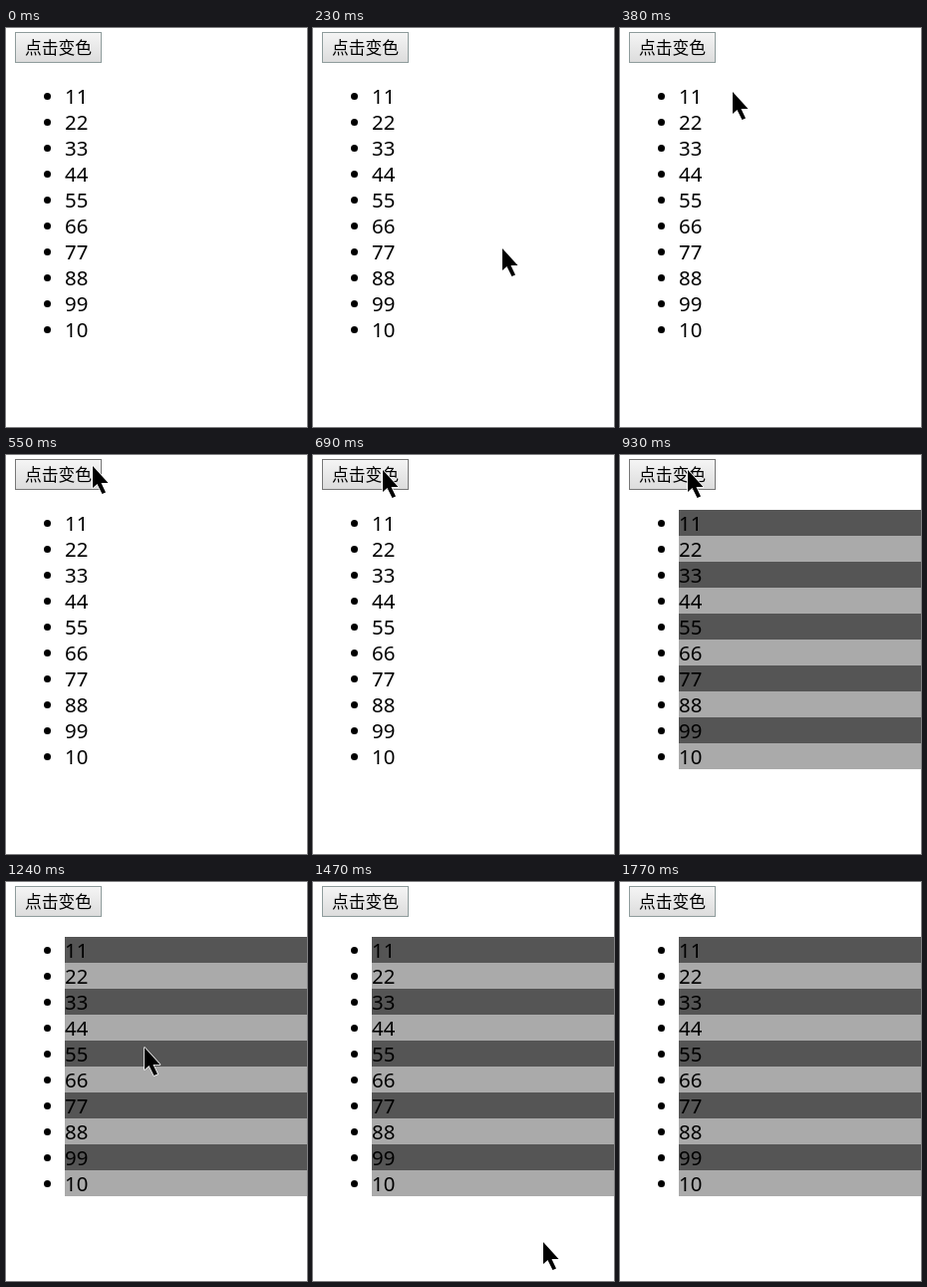
An HTML page for the animation above (2600 ms loop, 302 px wide and 400 px high).

```html
<!DOCTYPE html>
<html lang="zh">
<head>
<meta charset="utf-8">
<title>点击变色</title>
<style>
  html, body { margin: 0; width: 100%; height: 100%; overflow: hidden; background: #fff; }
  svg { display: block; }
  .item { font: 20.4px "Noto Sans", "Open Sans", sans-serif; }
  .label { font: 300 16.8px "Noto Sans CJK SC", "Noto Sans CJK", sans-serif; }
</style>
</head>
<body>
<svg width="302" height="400" viewBox="0 0 302 400">
  <defs>
    <linearGradient id="face" x2="0" y2="1">
      <stop offset="0" stop-color="#f5f5f5"/>
      <stop offset="1" stop-color="#dcdcdc"/>
    </linearGradient>
  </defs>
  <rect id="button" x="9.5" y="4.5" width="86" height="30" fill="url(#face)"/>
  <text class="label" x="19" y="26">点击变色</text>
  <g id="stripes"></g>
  <g id="list"></g>
  <path id="cursor" d="M0 0V22L4.5 18L9.5 28L13 26.5L8.5 17H15.5Z"
        stroke="#fff" stroke-width="1.6" stroke-linejoin="round" paint-order="stroke"/>
  <circle id="press" cx="67.5" cy="16.5" r="15.5" fill="#ff0" fill-opacity=".6"/>
</svg>
<script>
const LOOP = 2600, PRESS = 840, RELEASE = 930;
const START = 145, TICK = 77.2; // the pointer moves in ticks

// Pointer stops: tick, x, y
const stops = [
  [0, 244, 334], [1, 190, 221], [5, 87, 11], [8, 68, 15],
  [13, 68, 15], [17, 231, 361], [20, 236, 395]
];

const $ = id => document.getElementById(id);
const [button, stripes, list, press, cursor] =
  ['button', 'stripes', 'list', 'press', 'cursor'].map($);

function add(parent, tag, attrs, text = '') {
  const el = document.createElementNS('http://www.w3.org/2000/svg', tag);
  for (const name in attrs) el.setAttribute(name, attrs[name]);
  el.textContent = text;
  parent.append(el);
}

for (let i = 0; i < 10; i++) {
  const y = 55 + 26 * i;
  add(stripes, 'rect', { x: 59, y, width: 243, height: 26, fill: i % 2 ? '#aaa' : '#555' });
  add(list, 'circle', { cx: 41.5, cy: y + 13.5, r: 3.5 });
  add(list, 'text', { class: 'item', x: 59, y: y + 21 }, i < 9 ? (i + 1) * 11 : 10);
}

const show = (el, on) => el.setAttribute('visibility', on ? 'visible' : 'hidden');
const easeOut = u => u * (2 - u);

// Pointer position at a tick, or null while it is off the stage
function pointer(tick) {
  const next = stops.findIndex(stop => stop[0] >= tick);
  if (tick < 0 || next < 0) return null;
  const to = stops[next], from = stops[next - 1] || to;
  const k = easeOut((tick - from[0]) / (to[0] - from[0] || 1));
  return [1, 2].map(i => Math.round(from[i] + (to[i] - from[i]) * k));
}

function draw() {
  const t = performance.now() % LOOP;
  const pos = pointer(Math.floor((t - START) / TICK));
  const [x, y] = pos || [-99, -99];
  const hover = x >= 9 && x < 96 && y >= 4 && y < 35;

  show(cursor, pos);
  cursor.setAttribute('transform', `translate(${x} ${y})`);
  show(press, t >= PRESS && t < RELEASE);
  show(stripes, t >= RELEASE);
  button.setAttribute('stroke', hover ? '#777' : '#8f9c9c');
  requestAnimationFrame(draw);
}
draw();
</script>
</body>
</html>
```
